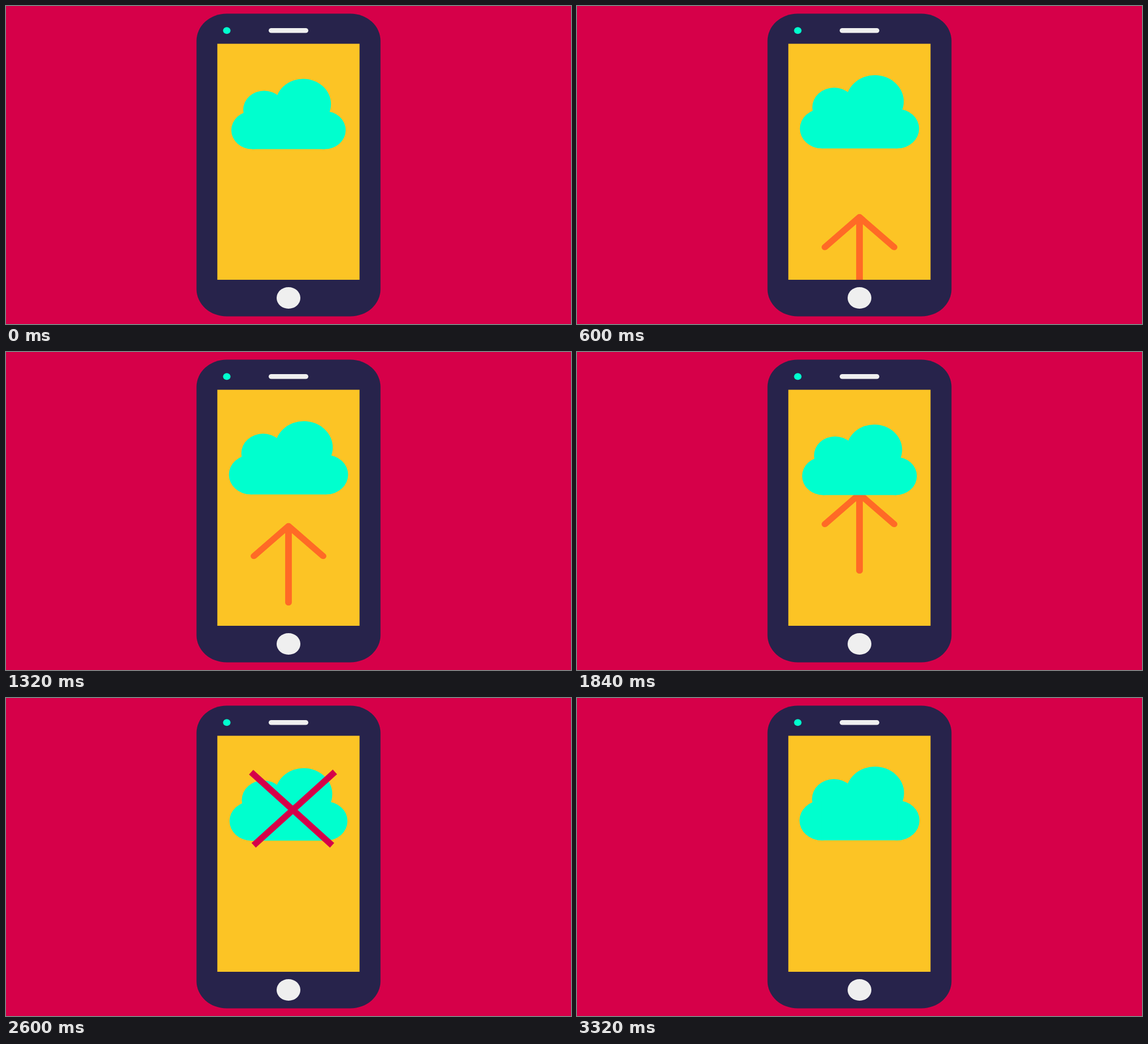
An HTML page that plays this animation: 998x561 px, repeating every 3360 ms.

```html
<!DOCTYPE html>
<html lang="en">
<head>
<meta charset="utf-8">
<title>Cloud upload</title>
<style>
  html, body { margin: 0; width: 100%; height: 100%; overflow: hidden; background: #d60049; }
  svg { display: block; width: 100%; height: 100%; }
</style>
</head>
<body>
<svg viewBox="0 0 998 561">
  <clipPath id="below"><rect x="373" y="200" width="252" height="283"/></clipPath>

  <rect x="336.5" y="13.5" width="325" height="534" rx="53" ry="48" fill="#27234b"/>
  <rect x="373.3" y="66.6" width="251.2" height="416.4" fill="#fcc425"/>
  <ellipse cx="390" cy="43.3" rx="6.6" ry="6" fill="#00ffce"/>
  <g fill="#efefef">
    <rect x="464" y="39" width="70" height="8.6" rx="4.6" ry="4.3"/>
    <ellipse cx="499" cy="515" rx="21" ry="19"/>
  </g>

  <g clip-path="url(#below)">
    <path id="arrow" d="M0 135V0M-55.5 53L0 0L55.5 53" fill="none" stroke="#ff6a26"
      stroke-width="10.7" stroke-linecap="round" stroke-linejoin="round"/>
  </g>

  <g id="cloud" fill="#00ffce">
    <ellipse cx="456" cy="183" rx="37" ry="33.5"/>
    <ellipse cx="525" cy="173" rx="49" ry="44.5"/>
    <ellipse cx="435" cy="219" rx="37" ry="33.5"/>
    <ellipse cx="563" cy="219" rx="37" ry="33.5"/>
    <rect x="435" y="186" width="128" height="66.5"/>
  </g>

  <path id="cross" d="M-74 -65L69 64M74 -65.5L-69.5 64" stroke="#d60049" stroke-width="11.2"/>
</svg>
<script>
const LOOP = 3360, STEP = 40, BEAT = 480;
const [arrow, cloud, cross] = ['arrow', 'cloud', 'cross'].map(id => document.getElementById(id));

// Eased progress from 0 to 1 between two times
function ease(t, from, to) {
  const x = Math.min(1, Math.max(0, (t - from) / (to - from)));
  return x * x * (3 - 2 * x);
}

function draw(t) {
  // The cloud swells and shrinks about the stage centre
  const phase = t % (2 * BEAT);
  const swell = 1 + 0.05 * (ease(phase, 0, BEAT) - ease(phase, BEAT, 2 * BEAT));
  cloud.setAttribute('transform', `translate(499 280.5) scale(${swell}) translate(-499 -280.5)`);

  // The arrow rises, rests, then slips behind the cloud
  const y = 493 - 186 * ease(t, 0, 1000) - 197 * ease(t, 1480, 2500);
  arrow.setAttribute('transform', `translate(499 ${y}) scale(1.1 1)`);

  // The cross grows and fades in, later the reverse
  const size = ease(t, 1840, 2200) - ease(t, 2800, 3280);
  cross.setAttribute('transform', `translate(507 195.8) scale(${size})`);
  cross.setAttribute('opacity', size);
}

const start = performance.now();
function tick() {
  const t = (performance.now() - start) % LOOP;
  draw(Math.floor(t / STEP) * STEP);
  requestAnimationFrame(tick);
}
tick();
</script>
</body>
</html>
```
